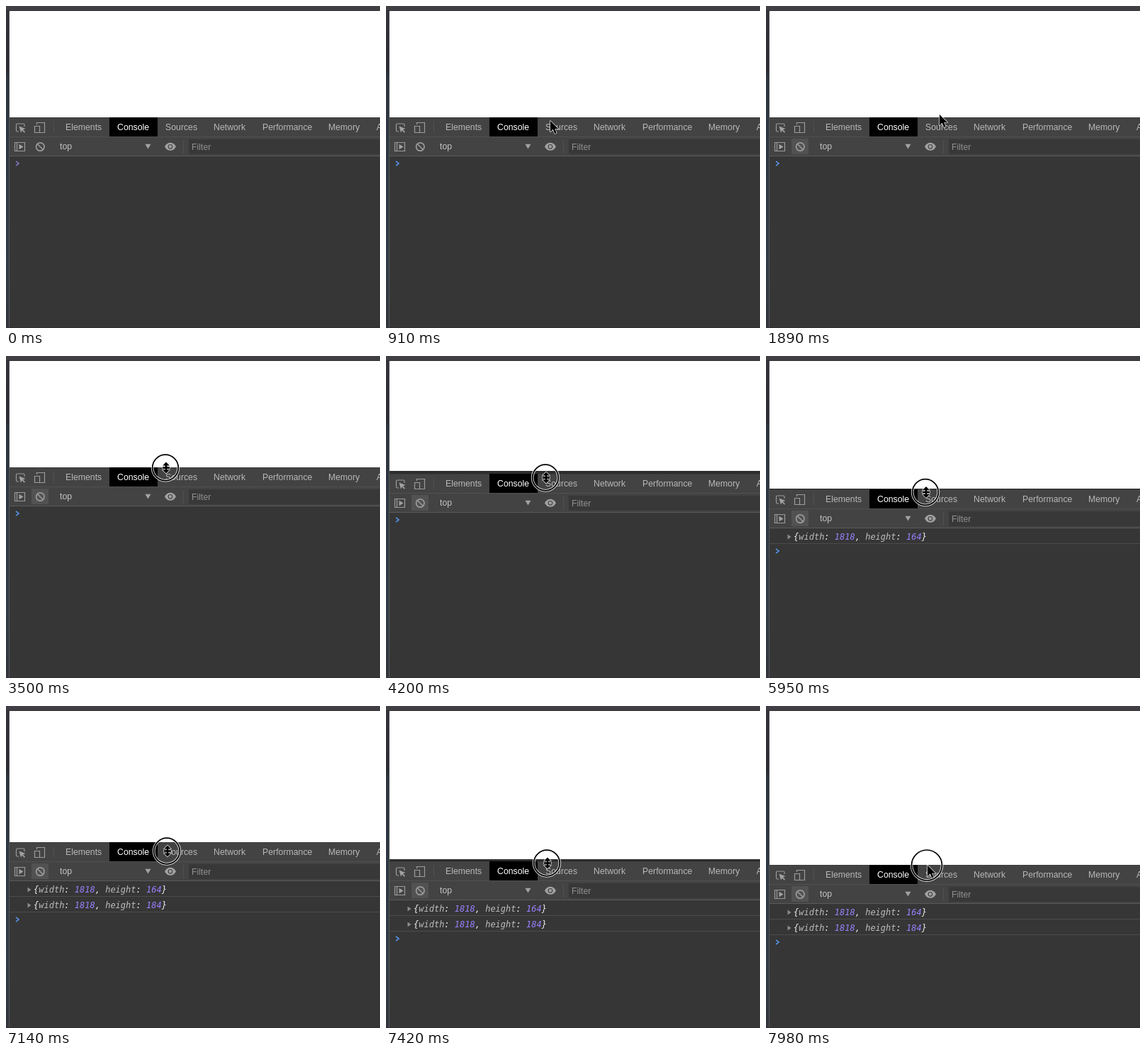
An HTML page that plays this animation: 528x454 px, repeating every 8000 ms.

```html
<!DOCTYPE html>
<html lang="en">
<head>
<meta charset="utf-8">
<title>Resizing the console</title>
<style>
  html, body { margin: 0; width: 100%; height: 100%; overflow: hidden; background: #363636; }
  svg { display: block; width: 528px; height: 454px; }
  .ui { font: 12.3px "Liberation Sans", Arial, sans-serif; fill: #b4b4b4; }
  .log { font: italic 12px "DejaVu Sans Mono", monospace; fill: #f0f0f0; white-space: pre; }
  .key { fill: #bdbdbd; }
  .num { fill: #9a80ff; }
  .icon { fill: none; stroke: #9b9b9b; stroke-width: 1.2; }
  .solid { fill: #a2a2a2; stroke: none; }
  .outlined { fill: #000; stroke: #fff; stroke-width: 1.2; stroke-linejoin: round; paint-order: stroke; }
</style>
</head>
<body>
<svg viewBox="0 0 528 454">
  <defs>
    <linearGradient id="edge" x2="0" y2="1">
      <stop offset="0" stop-color="#34323a"/>
      <stop offset=".2" stop-color="#2b2b32"/>
      <stop offset=".22" stop-color="#2c3440"/>
      <stop offset=".8" stop-color="#303c48"/>
      <stop offset="1" stop-color="#33343b"/>
    </linearGradient>
  </defs>
  <rect width="528" height="454" fill="#2d2d2d"/>
  <rect id="page" x="5" y="7" width="523" height="150" fill="#fff"/>

  <g id="panel">
    <rect x="4" y="157" width="524" height="300" fill="#363636"/>
    <rect x="4" y="157" width="524" height="54" fill="#434343"/>
    <path d="M4 157.5H528" stroke="#3a3d3b"/>
    <path d="M4 184.5H528" stroke="#505050"/>
    <rect x="146" y="157" width="68" height="27"/>
    <rect id="hover" x="36" y="187" width="24" height="22" fill="#525252"/>
    <rect x="258" y="188" width="270" height="21" fill="#383838"/>
    <path d="M4 211.5H528" stroke="#5a5a5a"/>
    <path d="M67.5 163V179M250.5 189V208" stroke="#505050"/>

    <g class="icon">
      <path d="M18 177H16Q14.500 177 14.500 175.500V167.500Q14.500 166 16 166H24.500Q26 166 26 167.500V170"/>
      <path class="solid" d="M18.500 169.500L27.500 173L24 174.300L27 177.500L25.800 178.700L22.800 175.500L21 178.500Z"/>
      <path d="M43.500 167V164.500H54.500V178.500H48M40.500 169.500H47.500V178.500H40.500Z"/>
      <path d="M12.500 192.500H26.500V204.500H12.500ZM15.500 192.500V204.500"/>
      <path class="solid" d="M18.500 194.800L24.500 198.500L18.500 202.200Z"/>
      <circle cx="48.300" cy="198.500" r="5.700" stroke-width="1.700"/>
      <path d="M44.300 194.500L52.300 202.500" stroke-width="1.700"/>
      <path class="solid" d="M196.500 194.800H204.500L200.500 201.500Z"/>
      <path class="solid" d="M224 198.300Q227 192.800 232 192.800T240 198.300Q237 203.800 232 203.800T224 198.300Z"/>
      <circle cx="232" cy="198.300" r="2.800" stroke="#434343"/>
    </g>
    <g id="labels" class="ui"></g>

    <g id="logs"></g>
    <path id="prompt" d="M14 218.800L18 222L14 225.200" fill="none" stroke-width="1.600"/>
  </g>

  <rect width="4" height="454" fill="url(#edge)"/>
  <path d="M4.500 7V454" stroke="#55585b"/>
  <rect width="528" height="7" fill="#413f44"/>
  <path d="M0 6.500H528" stroke="#2f2d32"/>
  <path d="M4 453.500H528" stroke="#302d30"/>

  <g id="ring" fill="none">
    <circle stroke="#fff" stroke-width="3.800" stroke-opacity=".75"/>
    <circle stroke="#000" stroke-width="1.700"/>
  </g>
  <path id="arrow" class="outlined" d="M0 0V15.500L3.700 12L6.300 18L8.800 17L6.300 11.200H11.300Z"/>
  <path id="resizer" class="outlined" d="M0 -8L5 -3H1.400V-1.200H5V1.200H1.400V3H5L0 8L-5 3H-1.400V1.200H-5V-1.200H-1.400V-3H-5Z"/>
</svg>
<script>
const LOOP = 8000, STEP = 70, REST = 157;
const el = id => document.getElementById(id);

// Each run starts at a time and takes one value per step; the last value holds.
const hoverPath = [
  [350, [252, 403], [247, 330], [236, 222], [225, 174]],
  [700, [226, 172], [228, 169], [230, 165], [232, 162], [233, 161]],
  [1120, [236, 159]],
  [1260, [237, 159], [237, 158], [238, 158]],
  [1890, [245, 153], [257, 154], [260, 159], [252, 164], [236, 163], [221, 160], [216, 157], [218, 156]],
  [2730, [230, 154], [248, 154], [259, 156], [252, 159], [236, 159], [225, 158]]
];
const dragPath = [
  [0, REST],
  [3850, 158, 159, 160, 162, 166, 171],
  [5320, 172, 175, 180, 183, 184, 185, 186, 187, 188, 191.5],
  [6930, 192],
  [7140, 204, 211, 216, 219, 221, 223, 224]
];

function valueAt(runs, t) {
  const run = runs.filter(r => r[0] <= t).pop();
  if (!run) return null;
  return run[Math.min(run.length - 1, 1 + Math.floor((t - run[0]) / STEP))];
}

const tabs = { Elements: 84, Console: 157, Sources: 225, Network: 293, Performance: 362, Memory: 455, Application: 523 };
const label = (text, x, y, fill) => `<text x="${x}" y="${y}" fill="${fill}" style="fill:${fill}">${text}</text>`;
el("labels").innerHTML =
  Object.entries(tabs).map(([name, x]) => label(name, x, 175, name === "Console" ? "#fff" : "#b8b8b8")).join("") +
  label("top", 76, 202, "#c4c4c4") + label("Filter", 262, 203, "#919191");

const entries = [[4830, 164], [6580, 184]];
el("logs").innerHTML = entries.map(([, height], i) => `
  <g transform="translate(0 ${i * 22})">
    <path d="M30.500 220.500L35.500 224L30.500 227.500Z" fill="#8b8b8b"/>
    <text class="log" x="39" y="228">{<tspan class="key">width</tspan>: <tspan class="num">1818</tspan>, <tspan class="key">height</tspan>: <tspan class="num">${height}</tspan>}</text>
    <path d="M5 233.500H528" stroke="#4c4c4c"/>
  </g>`).join("");
const rows = [...el("logs").children];

const show = (node, on) => node.setAttribute("display", on ? "inline" : "none");
const move = (node, x, y) => node.setAttribute("transform", `translate(${x} ${y})`);

function draw(t) {
  // The panel trails the pointer by one step, the page by two.
  const panelShift = valueAt(dragPath, Math.max(0, t - STEP)) - REST;
  const pageShift = valueAt(dragPath, Math.max(0, t - 2 * STEP)) - REST;
  move(el("panel"), 0, Math.round(panelShift));
  el("page").setAttribute("height", 150 + Math.round(Math.min(pageShift, panelShift)));

  const count = entries.filter(([start]) => t >= start).length;
  rows.forEach((row, i) => show(row, i < count));
  move(el("prompt"), 0, count * 22);
  el("prompt").setAttribute("stroke", t < 140 ? "#8577c8" : "#5596ec");
  show(el("hover"), t >= 1680);

  const pressed = t >= 3500, released = t >= 7980, resizing = t >= 3080 && !released;
  const [hx, hy] = valueAt(hoverPath, t) || [0, 0];
  const x = pressed ? (t >= 6930 ? 227 : 225) : hx;
  const y = pressed ? valueAt(dragPath, t) + 0.5 : hy;

  show(el("ring"), pressed);
  move(el("ring"), x, y);
  for (const circle of el("ring").children) circle.setAttribute("r", released ? 21.5 : 18.3);
  show(el("arrow"), t >= 350 && !resizing);
  move(el("arrow"), released ? x + 1 : x, y);
  show(el("resizer"), resizing);
  move(el("resizer"), x + 1, y);
}

const began = performance.now();
function tick() {
  draw((performance.now() - began) % LOOP);
  requestAnimationFrame(tick);
}
tick();
</script>
</body>
</html>
```
